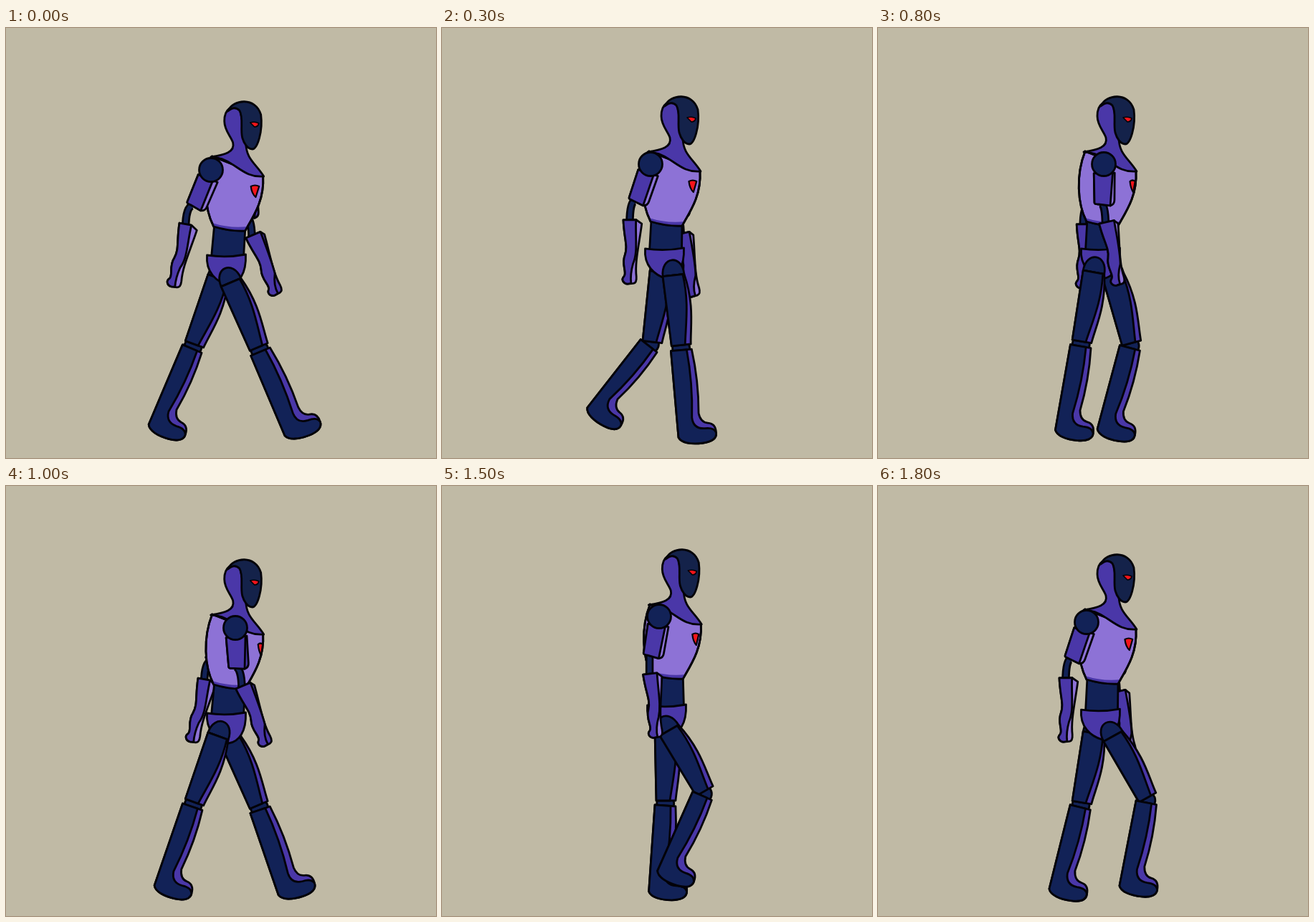
These frames come from a looping animation (600x600 px, 2000 ms). An HTML page with a canvas:

```html
<!DOCTYPE html>
<html lang="en">
<head>
<meta charset="utf-8">
<title>Walking robot</title>
<style>
html, body { margin: 0; width: 100%; height: 100%; overflow: hidden; background: #c0baa5; }
canvas { display: block; width: 100%; height: 100%; }
</style>
</head>
<body>
<canvas id="stage" width="600" height="600"></canvas>
<script>
const ctx = document.getElementById('stage').getContext('2d');
const NAVY = '#122257', FACE = '#14224a', PURPLE = '#4a37a8', LILAC = '#8d72d6', RED = '#f5141a', INK = '#030208';
const LOOP = 2000, STEP = 500, HOLD = 300;

// One stride in eight stages, shared by both legs half a cycle apart.
// Angles in degrees from straight down, positive is forward.
const THIGH = [23, 6, 0, -10, -20, 0, 20, 22];
const SHIN = [21, 3, -2, -12, -21, -36, -26, -13];
const HIP_X = [314, 323, 312, 301, 296, 305, 317, 328];

const turn = stage => stage * Math.PI / 4;
const lerp = (a, b, k) => a + (b - a) * k;

// The point at a length and angle from x, y.
function reach(x, y, deg, len) {
  const a = deg * Math.PI / 180;
  return [x + Math.sin(a) * len, y + Math.cos(a) * len];
}

function ink(path, fill, width = 2.8) {
  if (fill) { ctx.fillStyle = fill; ctx.fill(path); }
  ctx.strokeStyle = INK;
  ctx.lineWidth = width;
  ctx.stroke(path);
}

// Places a path along a bone: x in pixels across, y in percent of its length.
function bone([ax, ay], [bx, by]) {
  const dx = bx - ax, dy = by - ay, len = Math.hypot(dx, dy);
  const m = new DOMMatrix([dy / len, -dx / len, dx / 100, dy / 100, ax, ay]);
  return (d, fill) => {
    const p = new Path2D();
    p.addPath(new Path2D(d), m);
    ink(p, fill);
  };
}

function ball([x, y], r) {
  const p = new Path2D();
  p.arc(x, y, r, 0, 7);
  ink(p, NAVY);
}

function boot(knee, shin) {
  const top = reach(...knee, shin, 7);
  const back = reach(...top, shin - 90, 14.5), front = reach(...top, shin + 90, 14.5);
  const heel = reach(...back, shin, 121);
  const tilt = 93 + .8 * shin;
  const at = (along, up) => reach(...reach(...heel, tilt, along), tilt + 90, up).join(' ') + ' ';
  const edge = (x, up, k) => {
    const end = [lerp(back[0], front[0], k), lerp(back[1], front[1], k)];
    const foot = at(x, up).split(' ').map(Number);
    const bulge = reach(lerp(foot[0], end[0], .5), lerp(foot[1], end[1], .5), shin + 90, 5);
    return `${foot[0]} ${foot[1]}Q${bulge}  ${end}Z`;
  };
  const sole = `M${back}L${heel}C${at(3, -8)}${at(16, -12)}${at(32, -12)}C${at(45, -12)}${at(53, -8)}${at(53, 0)}`;
  ink(new Path2D(`${sole}Q${at(54, 13)}${at(43, 15)}Q${at(33, 17)}${edge(32, 30, 1)}`), PURPLE);
  ink(new Path2D(`${sole}Q${at(51, 8)}${at(38, 8)}Q${at(22, 9)}${edge(22, 25, .76)}`), NAVY);
}

function leg(stage, side, y) {
  const a = turn(stage);
  // The near leg swings through a little earlier than the far one.
  const lead = side * 10 * Math.max(0, -Math.sin(a));
  const hip = [HIP_X[stage], y + 3 * Math.cos(a)];
  const knee = reach(...hip, THIGH[stage] + lead, 98);
  const shin = SHIN[stage] + 2 * side;
  ball(reach(...knee, shin, 4), 12);
  const thigh = bone(hip, knee);
  thigh('M-15 0C-15-29 15-29 15 0Z', NAVY);
  thigh('M-15 0L-13 100L14 100C16 75 25 45 15 0Z', PURPLE);
  thigh('M-15 0L-13 100L6 100C10 70 18 40 13 0Z', NAVY);
  boot(knee, shin);
}

// swing runs from 1, fully back, to -1, fully forward.
function arm(x, y, swing) {
  const shoulder = [x, y];
  const tip = reach(x, y, -8.5 - 13.5 * swing, 57);
  const wrist = [tip[0] - 2 - 9 * swing, tip[1] + 24];
  const hand = reach(...wrist, 4 - 17 * swing ** 3, 89);
  const edge = 7.5 - 2.5 * swing;
  const side = swing > -.9 ? LILAC : PURPLE;

  const elbow = new Path2D(`M${tip[0] - 5} ${tip[1] - 3}Q${wrist[0] - 3} ${tip[1]} ${wrist[0] - 3} ${wrist[1] + 4}`);
  for (const [w, c] of [[11.5, INK], [6, NAVY]]) {
    ctx.lineWidth = w;
    ctx.strokeStyle = c;
    ctx.stroke(elbow);
  }
  const upper = bone(shoulder, tip);
  upper('M-14 22L-14 94Q-14 98-8 98L8 102Q14 99 14 88L15 22Z', side);
  upper(`M-14 22L-14 94Q-14 98-8 98L8 102L${edge + 3} 22Z`, PURPLE);
  ball(shoulder, 16.5);
  const fore = bone(wrist, hand);
  const back = 'C-10 30-4 40-8 55C-13 70-4 82-8 88C-13 94-8 100-3 100';
  fore(`M-12 0${back}L5 99Q10 98 9 88C6 65 11 40 14 5L${edge}-1Z`, side);
  fore(`M-12 0${back}L2 99Q0 85 ${edge - 2} 68C10 50 ${edge} 30 ${edge}-1Z`, PURPLE);
}

function hips(x, y, dx, dy) {
  ink(new Path2D(`M${dx + 290} ${dy + 275}L${dx + 333} ${dy + 282}L${x + 24} ${y + 3}L${x - 21} ${y + 3}Z`), NAVY);
  ink(new Path2D(`M${x - 27} ${y}Q${x} ${y + 4} ${x + 27} ${y - 1}` +
    `C${x + 28} ${y + 25} ${x + 18} ${y + 40} ${x + 3} ${y + 42}` +
    `C${x - 14} ${y + 37} ${x - 29} ${y + 24} ${x - 27} ${y}Z`), PURPLE);
}

function torso(dx, dy, c) {
  const ex = 346 - 5 * c, ew = 9 + 2.5 * c;
  const part = (d, fill, width) => ink(new Path2D(d), fill, width);
  ctx.save();
  ctx.translate(dx, dy);
  const chest = 'M287 179C274 212 276 252 289 277Q312 284 333 283C345 262 360 240 358 207Z';
  part(chest, LILAC);
  ctx.fillStyle = PURPLE;
  ctx.fill(new Path2D('M287 272Q312 280 337 277L333 283Q312 284 289 277Z'));
  part(chest);
  part(`M${ex} 221Q${ex + ew / 2} 218 ${ex + ew} 221L${ex + ew / 2 + 1} 236Q${ex + 1} 231 ${ex} 221Z`, RED, 2.2);
  part('M285 180C305 177 319 173 316 160C313 151 304 143 304 130C304 112 315 107 326 113L334 160' +
    'C334 183 348 189 359 207C327 210 318 181 285 180Z', PURPLE);
  part('M309 116C316 99 348 96 355 121C358 144 350 169 343 169C336 169 331 160 329 153' +
    'C326 140 331 125 325 115Q318 108 309 116Z', FACE);
  part('M340 132Q347 130 352 133Q351 138 346 138Z', RED, 1.6);
  ctx.restore();
}

function draw(t) {
  // Each half second holds one long and one short pose.
  const i = 2 * Math.floor(t / STEP) + (t % STEP >= HOLD ? 1 : 0);
  const a = turn(i), c = Math.cos(a), bob = Math.cos(2 * a);
  const dx = 2 - 1.3 * bob, dy = 7 * bob - 7;
  const hipY = 345 + 7 * bob - 3 * Math.sin(a);

  ctx.fillStyle = '#c0baa5';
  ctx.fillRect(0, 0, 600, 600);
  ctx.lineJoin = 'round';
  arm(323 + 11 * c, 201 + 7 * c, -c);
  leg((i + 4) % 8, -1, hipY);
  hips(310.5 - 3 * bob, hipY - 35, dx, dy);
  torso(dx, dy, c);
  leg(i, 1, hipY);
  arm(303 - 17 * c, 190 + 8 * bob, c);
}

const begin = performance.now();
function tick() {
  draw((performance.now() - begin) % LOOP);
  requestAnimationFrame(tick);
}
tick();
</script>
</body>
</html>
```
